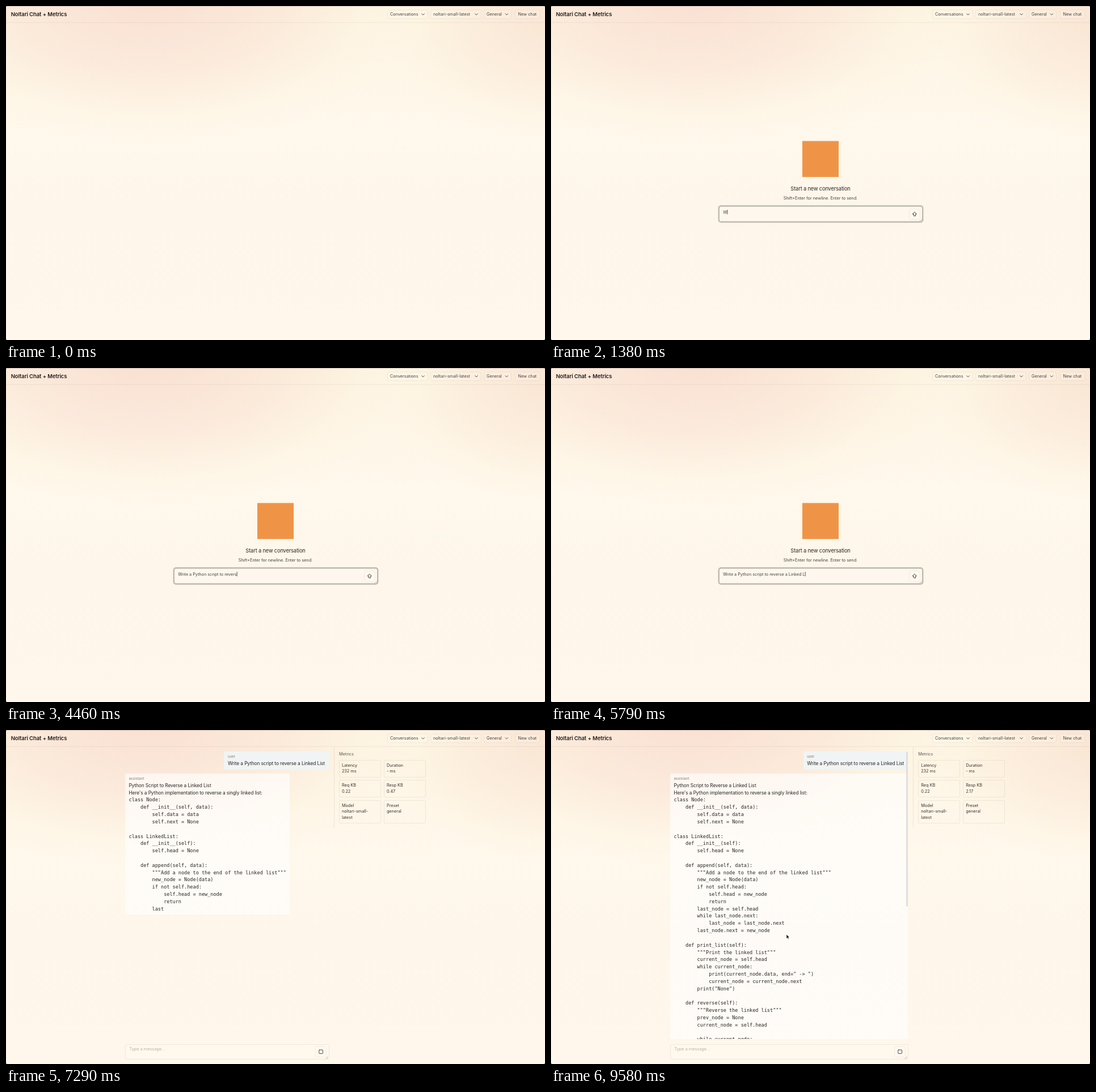
Recreate the animation shown at these times as an HTML page. Size 950 by 590 pixels, loop 9620 ms.

```html
<!DOCTYPE html>
<html lang="en">
<head>
<meta charset="utf-8">
<title>Chat with metrics</title>
<style>
  html, body { margin: 0; width: 100%; height: 100%; overflow: hidden; background: #222; }
  #stage {
    position: absolute; width: 950px; height: 590px; overflow: hidden; border-radius: 2px;
    font: 7.3px/10.6px Inter, sans-serif; color: #38332f;
    background:
      radial-gradient(480px 265px at 250px -15px, rgba(246, 208, 198, .56), rgba(248, 216, 202, .38) 48%, rgba(252, 240, 216, .2) 80%, rgba(253, 245, 226, 0)),
      radial-gradient(300px 215px at 965px 25px, rgba(246, 216, 198, .52), rgba(249, 223, 204, .36) 48%, rgba(252, 240, 216, .2) 80%, rgba(253, 245, 226, 0)),
      linear-gradient(#fdf4e3, #fff8ec 38%, #fef6ea 60%, #fff7eb);
  }
  #stage::after { content: ""; position: absolute; inset: 0; border-top: 1px solid rgba(60, 40, 40, .22); border-left: 1px solid rgba(0, 0, 0, .04); }
  svg { position: absolute; left: 0; top: 0; }
  text { fill: #47423e; white-space: pre; }
  .box { fill: rgba(255, 255, 255, .12); stroke: rgba(70, 50, 30, .06); }
  .icon { fill: none; stroke: #37332f; stroke-width: .9; stroke-linejoin: round; stroke-linecap: round; }
  .grip { fill: none; stroke: #aaa69d; stroke-width: .7; }

  #chat { position: absolute; left: 210px; top: 30px; display: flex; align-items: flex-start; }
  #column { position: relative; min-width: 358.5px; }
  #scroller { margin-top: 8px; max-height: 507.5px; overflow: hidden; }
  .message { width: max-content; padding: 4px 6.5px; border-radius: 2px; font-size: 8.3px; line-height: 12.82px; letter-spacing: -.01em; color: #292522; white-space: pre; }
  .message small { display: block; margin-bottom: 1px; font-size: 6.2px; line-height: 10px; letter-spacing: .02em; color: #807b76; }
  .user { margin-left: auto; background: #f1f4f4; }
  .assistant { margin-top: 7px; background: rgba(255, 255, 255, .64); }
  #code { font: 8.54px/12.82px "DejaVu Sans Mono", monospace; letter-spacing: 0; }
  #thumb { position: absolute; right: -.5px; top: 8px; width: 3.5px; border-radius: 2px; background: #dedfe2; }
  #composer { position: absolute; left: 0; right: -1px; top: 525px; height: 25px; border: 1px solid rgba(70, 50, 30, .07); border-radius: 4px; background: rgba(255, 255, 255, .12); }
  #composer span { position: absolute; left: 6.5px; top: 3px; color: #b7b1a7; }
  #composer svg { left: auto; right: 0; top: 0; }

  aside { margin-left: 9.5px; padding: 8px 0 8px 8px; border-left: 1px solid rgba(70, 50, 30, .09); }
  aside h2 { margin: 0 0 4.4px; font: inherit; color: #5e5852; }
  #cards { display: grid; grid-template-columns: 74px 74px; gap: 4.4px 5px; }
  #cards div { box-sizing: border-box; padding: 3.9px; border: 1px solid rgba(70, 50, 30, .08); border-radius: 2px; white-space: pre; }
</style>
</head>
<body>
<div id="stage">
  <svg width="950" height="590" id="scene">
    <path d="M0 29.2H950" stroke="rgba(70,50,30,.07)"/>
    <text x="8.7" y="18.2" style="font-size:9.5px;font-weight:600;letter-spacing:-.01em;fill:#211d1b">Noltari Chat + Metrics</text>
    <g id="menu"></g>
    <g id="empty">
      <rect x="443" y="238.5" width="64" height="63.5" fill="#ef9447"/>
      <text x="475" y="326.2" text-anchor="middle" style="font-size:9.3px;letter-spacing:-.017em;fill:#2d2926">Start a new conversation</text>
      <text x="475" y="342.4" text-anchor="middle">Shift+Enter for newline. Enter to send.</text>
      <rect class="box" x="296.5" y="354" width="358" height="27" rx="3.5"/>
      <rect id="ring" x="295.8" y="353.3" width="359.4" height="28.2" rx="3.8" fill="none" stroke="#bdbbb0" stroke-width="2.4"/>
      <text id="typed" x="303.2" y="366.7" style="font-size:7.22px"></text>
      <rect id="caret" y="360" width=".8" height="8" fill="#2d2926"/>
      <rect class="box" x="631.5" y="358.5" width="19" height="19" rx="4"/>
      <path class="icon" d="M640.9 364l3.4 3.6h-1.8v3.2h-3.2v-3.2h-1.8z"/>
      <path class="grip" d="M649.5 380.5l4.5-4.5M652 380.5l2-2"/>
    </g>
  </svg>

  <div id="chat">
    <div id="column">
      <div id="scroller">
        <div class="message user"><small>user</small><span id="question"></span></div>
        <div class="message assistant"><small>assistant</small><div id="prose"></div><div id="code"></div></div>
      </div>
      <div id="thumb"></div>
      <div id="composer">
        <span>Type a message...</span>
        <svg width="26" height="26">
          <rect class="box" x="2.5" y="2.5" width="19" height="19" rx="4"/>
          <rect class="icon" x="8.8" y="9" width="6.6" height="6.6" rx="1"/>
          <path class="grip" d="M20 25l4.5-4.5M22.5 25l2-2"/>
        </svg>
      </div>
    </div>
    <aside>
      <h2>Metrics</h2>
      <div id="cards"></div>
    </aside>
  </div>
</div>

<script>
const LOOP = 9620, SENT = 6380, FIRST_TOKEN = 6670;
const MARKUP = 15; // response characters that are not shown
const PROMPT = "Write a Python script to reverse a Linked List";
const PROSE = `Python Script to Reverse a Linked List
Here's a Python implementation to reverse a singly linked list:
`;
const CODE = `class Node:
    def __init__(self, data):
        self.data = data
        self.next = None

class LinkedList:
    def __init__(self):
        self.head = None

    def append(self, data):
        """Add a node to the end of the linked list"""
        new_node = Node(data)
        if not self.head:
            self.head = new_node
            return
        last_node = self.head
        while last_node.next:
            last_node = last_node.next
        last_node.next = new_node

    def print_list(self):
        """Print the linked list"""
        current_node = self.head
        while current_node:
            print(current_node.data, end=" -> ")
            current_node = current_node.next
        print("None")

    def reverse(self):
        """Reverse the linked list"""
        prev_node = None
        current_node = self.head

        while current_node:
            next_node = current_node.next  # Store the next node
            current_node.next = prev_node  # Reverse the current node's pointer
            prev_node = current_node  # Move prev_node one step forward
            current_node = next_node  # Move current_node one step forward

        self.head = prev_node  # Update the head to the new first node

# Example usage
if __name__ == "__main__":
    # Create a linked list: 1 -> 2 -> 3
    linked_list = LinkedList()
    linked_list.append(1)
    linked_list.append(2)
    linked_list.append(3)

    print("Original Linked List:")
    linked_list.print_list()

    # Reverse the linked list
    linked_list.reverse()

    print("Reversed Linked List:")
    linked_list.print_list()

Explanation:
1. Node Class: Represents a node in the linked list.
2. LinkedList Class: Contains methods to work with the list.
   - append: Adds a new node to the end of the list.
   - print_list: Prints every element of the list.
   - reverse: Reverses the list in place by changing pointers.
3. Reversal Process:
   - Three pointers are used: prev_node, current_node, next_node.
   - Each step turns one pointer around and moves forward.`;

// [time, value] pairs, linear in between
const TYPING = [[1000, 0], [1340, 1], [1920, 6], [2170, 7], [3210, 19], [3580, 22], [3750, 23], [3880, 25],
  [4040, 26], [4540, 33], [4710, 34], [4830, 35], [5080, 36], [5790, 43], [6000, 44], [6250, 46]];
const RESPONSE_KB = [[FIRST_TOKEN, 0], [7290, .47], [8130, 1.31], [8420, 1.5], [8670, 1.5], [9580, 2.17]];

const $ = id => document.getElementById(id);

function track(points, t) {
  if (t <= points[0][0]) return points[0][1];
  const i = points.findIndex(p => p[0] >= t);
  if (i < 0) return points[points.length - 1][1];
  const [t0, a] = points[i - 1], [t1, b] = points[i];
  return a + (b - a) * (t - t0) / (t1 - t0);
}

const button = (label, left, right, textX, arrowX) =>
  `<rect class="box" x="${left}" y="7" width="${right - left}" height="15.5" rx="3"/>
   <text x="${textX}" y="17.3">${label}</text>` +
  (arrowX ? `<path class="icon" d="M${arrowX - 2.3} 13.6l2.3 2.3 2.3-2.3"/>` : "");

$("menu").innerHTML =
  button("Conversations", 672.5, 743.5, 677, 735) +
  button("noltari-small-latest", 748.5, 837.5, 753, 829) +
  button("General", 842.5, 890.5, 847, 882.4) +
  button("New chat", 897.5, 941.5, 902.5);

$("cards").innerHTML = [
  ["Latency", "<span id='latency'></span>"], ["Duration", "- ms"],
  ["Req KB", "0.22"], ["Resp KB", "<span id='resp'></span>"],
  ["Model", "noltari-small-\nlatest"], ["Preset", "general"]
].map(card => `<div>${card.join("\n")}</div>`).join("");

$("question").textContent = PROMPT;

// mouse pointer, above everything else
$("stage").insertAdjacentHTML("beforeend",
  `<svg id="pointer" width="12" height="14"><path d="M1 1v7.6l1.8-1.6 1.2 2.6 1.3-.6-1.2-2.5h2.3z" fill="#111" stroke="#fff" stroke-width=".6"/></svg>`);

function drawEmpty(t) {
  const fade = Math.min(1, Math.max(0, (t - 40) / 460));
  $("empty").style.opacity = 1 - (1 - fade) ** 2;
  const focused = t >= 1000;
  const count = Math.floor(track(TYPING, t) + 1e-6);
  $("typed").textContent = count ? PROMPT.slice(0, count) : "Type a message...";
  $("typed").style.fill = count ? "#47423e" : "#b7b1a7";
  $("ring").style.display = $("caret").style.display = focused ? "" : "none";
  $("caret").setAttribute("x", 303.4 + (count ? $("typed").getComputedTextLength() : 0));
}

function drawChat(t) {
  const kb = track(RESPONSE_KB, t);
  const count = Math.max(0, Math.floor(kb * 1024 - MARKUP));
  $("prose").textContent = PROSE.slice(0, count);
  $("code").textContent = CODE.slice(0, Math.max(0, count - PROSE.length));
  $("latency").textContent = t < FIRST_TOKEN ? "- ms" : "232 ms";
  $("resp").textContent = kb.toFixed(2);

  const { clientHeight: view, scrollHeight: content } = $("scroller");
  $("thumb").style.height = (content > view + 1 ? view * view / content : 0) + "px";
}

function drawPointer(t) {
  const left = 1 - Math.min(1, Math.max(0, (t - 9000) / 400));
  $("pointer").style.display = t >= 9000 ? "" : "none";
  $("pointer").style.transform = `translate(${414 + 14 * left ** 2}px, ${360 + 21 * left ** 2}px)`;
}

function render(now) {
  const t = now % LOOP, chatting = t >= SENT;
  $("empty").style.display = chatting ? "none" : "";
  $("chat").style.display = chatting ? "" : "none";
  if (chatting) drawChat(t); else drawEmpty(t);
  drawPointer(t);
  requestAnimationFrame(() => render(performance.now()));
}
render(performance.now());
</script>
</body>
</html>
```
